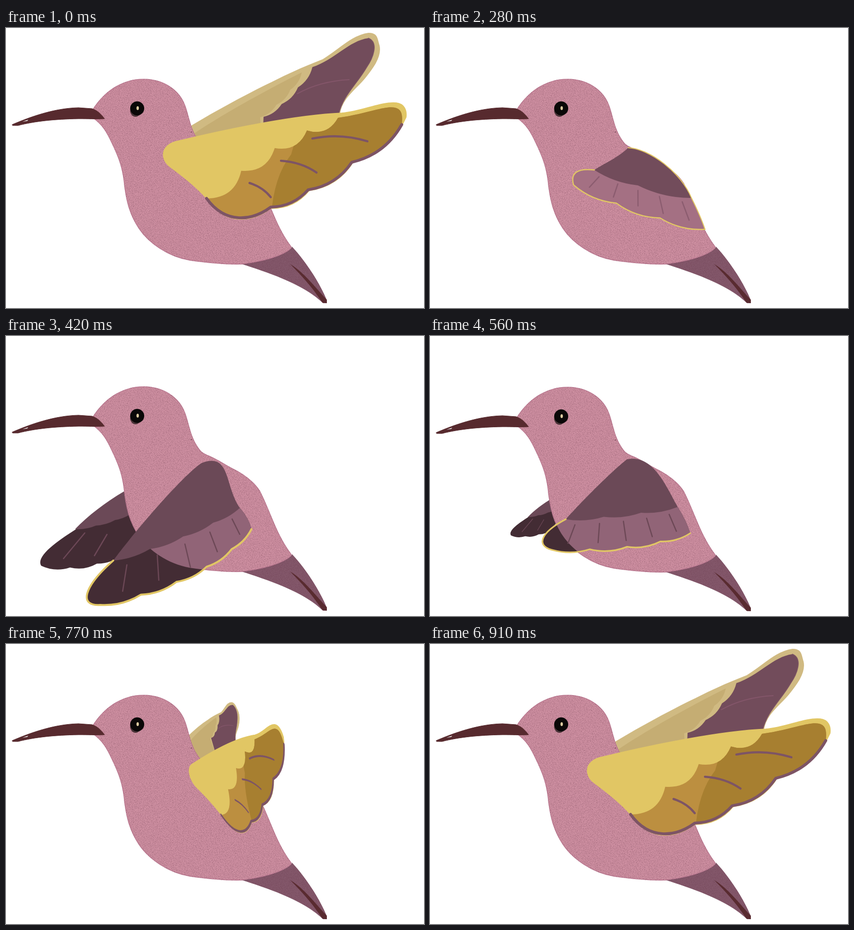
Write an HTML page that moves like this. It is 865 by 580 pixels and loops after 0.98 s.

```html
<!DOCTYPE html>
<html lang="en">
<head>
<meta charset="utf-8">
<title>Hummingbird</title>
<style>
html, body { margin: 0; width: 100%; height: 100%; overflow: hidden; background: #fff; }
svg { display: block; width: 865px; height: 580px; }
.pose { visibility: hidden; }
.pose.on { visibility: visible; }
</style>
</head>
<body>
<svg viewBox="0 0 865 580" xmlns="http://www.w3.org/2000/svg" stroke-linecap="round" stroke-linejoin="round">
  <defs>
    <filter id="grain" x="0" y="0" width="865" height="580" filterUnits="userSpaceOnUse" color-interpolation-filters="sRGB">
      <feTurbulence type="fractalNoise" baseFrequency=".7" numOctaves="2" seed="4"/>
      <feColorMatrix values="0 0 0 0 .38  0 0 0 0 .2  0 0 0 0 .27  1.2 0 0 0 -.54"/>
      <feComposite in2="SourceAlpha" operator="in" result="g"/>
      <feMerge><feMergeNode in="SourceGraphic"/><feMergeNode in="g"/></feMerge>
    </filter>
    <path id="torso" d="M181 167C205 131 240 106 285 106C325 106 358 128 370 160C378 180 380 206 395 229C402 240 406 244 416 248C435 255 450 266 465 274C490 286 512 302 525 322C546 362 560 415 590 453L589 457C575 470 540 482 488 489C450 490 415 486 380 481C335 473 295 445 275 415C255 385 248 355 244 315C240 285 232 265 220 240C210 218 200 200 181 187Z"/>
    <clipPath id="onBody"><use href="#torso" y="-1"/></clipPath>
    <g id="far"></g>
    <g id="near"></g>
  </defs>
  <g id="back"></g>
  <g id="bird">
    <g filter="url(#grain)">
      <path fill="#84586b" d="M592 453C622 485 650 530 664 564L664 570L656 570C620 535 560 512 488 489C540 482 575 470 589 457Z"/>
      <use href="#torso" fill="#cf90a2" stroke="#c27f97" stroke-width="1.5"/>
    </g>
    <path fill="#592b30" d="M588 489C613 503 638 535 664 563L664 570L655 569C632 535 612 513 588 489Z"/>
    <path fill="#572a2e" stroke="#572a2e" d="M13 200C50 184 100 166 150 165L178 167C190 171 198 180 204 188C185 189 170 188 150 188C100 189 60 193 25 202L14 202Z"/>
    <path fill="#fff" d="M34 194L46 190L44 192.500Z"/>
    <ellipse cx="268" cy="171" rx="11" ry="13" fill="#4b3439"/>
    <circle cx="271.500" cy="166.500" r="14.500" fill="#0a0808"/>
    <ellipse cx="272.500" cy="166" rx="2.500" ry="4" fill="#dccba0"/>
    <circle cx="383.500" cy="215.500" r="1" fill="#5a2c3c"/>
  </g>
  <g id="front"></g>
</svg>
<script>
const MAUVE = '#7d5465', PLUM = '#724c5b', DARK = '#432c34', GOLD = '#e1c664', TAN = '#d0ba82';
const $ = id => document.getElementById(id);
const lerp = (a, b, k) => a + (b - a) * k;
const between = (p, q, k) => p.map((v, i) => lerp(v, q[i], k));
const bend = (a, c, b, t) => between(between(a, c, t), between(c, b, t), t);

// Feathered edge: n lobes strung along the quadratic curve a-c-b.
function lobes(a, c, b, n, bulge) {
  let d = 'L' + a, p = a;
  for (let i = 1; i <= n; i++) {
    const q = bend(a, c, b, i / n);
    const x = (p[0] + q[0]) / 2 - 2 * bulge * (q[1] - p[1]);
    const y = (p[1] + q[1]) / 2 + 2 * bulge * (q[0] - p[0]);
    d += `Q${x} ${y} ${q}`;
    p = q;
  }
  return d;
}
const fill = (d, color, more = '') => `<path d="${d}" fill="${color}" ${more}/>`;
const line = (d, color, w) => `<path d="${d}" fill="none" stroke="${color}" stroke-width="${w}"/>`;
const repeat = (n, f) => Array.from({ length: n }, (_, i) => f(i)).join('');

function nearWing() {
  const rim = lobes([819, 200], [654, 333], [548, 371], 3, -.11) + 'C510 399 455 408 415 353';
  const ochre = 'M415 353' + lobes([415, 353], [561, 228], [687, 186], 4, .2) +
    'C745 178 785 160 805 165C820 168 821 182 819 200' + rim + 'Z';
  const outline = 'M415 353C390 325 360 303 340 288C318 272 318 240 360 233C460 209 600 180 695 176C740 172 775 152 808 155C824 157 830 170 828 185' +
    lobes([828, 185], [657, 338], [548, 374], 3, -.12) + 'C510 402 455 412 415 353Z';
  return `<clipPath id="inOchre"><path d="${ochre}"/></clipPath>` +
    fill(outline, GOLD, `stroke="${GOLD}" stroke-width="1.5"`) + fill(ochre, '#bc8f40') +
    fill('M608 200L900 100L900 400L548 400Q552 310 590 262Z', '#a77f30', 'clip-path="url(#inOchre)"') +
    line('M819 200' + rim, MAUVE, 6) +
    repeat(3, i => {
      const len = 114 * .68 ** i, turn = .05 + .27 * i;
      const x = 634 - 65 * i, y = 229 + 46 * i;
      const dx = len * Math.cos(turn), dy = len * Math.sin(turn);
      return line(`M${x} ${y}q${dx / 2 + dy * .2} ${dy / 2 - dx * .13} ${dx} ${dy}`, MAUVE, 4.5);
    });
}

function farWing() {
  const side = 'C772 30 760 62 746 82C725 118 697 140 688 180';
  return fill('M370 211C450 163 520 127 550 113C590 92 620 80 655 66C690 45 715 16 750 11C770 10 768 26 772 36C778 60 755 88 742 104C722 128 695 145 690 178L690 225L530 260L400 290Z',
      TAN, `stroke="${TAN}" stroke-width="2"`) +
    fill('M380 225C430 190 520 138 612 92' + lobes([612, 92], [580, 150], [526, 185], 3, -.1) + 'L530 260L400 290Z', '#c5ad73') +
    fill('M530 255' + lobes([533, 184], [592, 150], [634, 81], 3, .1) + 'C680 66 710 26 750 21' + side + 'L690 225Z', PLUM) +
    line('M750 21' + side, MAUVE, 1.5) + line('M603 136Q650 110 710 107', '#84566a', 2);
}

// Raised wing: k = 0 spread, k = 1 half closed.
function place(id, closed, k) {
  const m = [1, 0, 0, 1, 0, 0].map((v, i) => lerp(v, closed[i], k));
  return `<use href="#${id}" transform="matrix(${m})"/>`;
}
const raised = k => ({
  back: place('far', [.336, .094, .171, .543, 213.8, 44.5], k),
  front: place('near', [.43, -.0235, .286, .898, 165.7, 46.7], k)
});

// Lowered wing: shoulder, its two handles, heel, covert bend, covert tip, two handles,
// heel bend, trailing edge start, bend and end, two handles of the wing tip.
const keys = s => s.split(' ').map(p => p.split(',').map(Number));
const FOLDED = keys('410,248 455,250 520,300 541,352 420,329 340,294 365,278 390,268 560,390 569,417 428,387 297,325 290,300 305,290');
const SWEPT = keys('405,263 465,240 452,310 484,356 380,420 222,465 270,400 370,285 503,378 508,400 419,510 195,557 150,560 160,520');

function lowered(key, n, flap, down) {
  const [top, h1, h2, heel, mid, tip, k1, k2, turn, start, low, end, t1, t2] = key;
  const ridge = `M${top}C${h1} ${h2} ${heel}`;
  const trail = lobes(start, low, end, n, -.08) + `C${t1} ${t2} ${tip}`;
  const feathers = `M${heel}Q${turn} ${start}${trail}Z`;
  const coverts = ridge + lobes(heel, mid, tip, n - 1, -.06) + `C${k1} ${k2} ${top}Z`;
  const veins = repeat(5, i => {
    const t = .1 + .2 * i, a = bend(heel, mid, tip, t), b = bend(start, low, end, t);
    return line(`M${between(a, b, .2)}L${between(a, b, .8)}`, down ? '#6c4856' : '#8b5c6f', 2.5);
  });
  return (down ? fill(feathers, DARK) + fill(feathers, '#916477', 'clip-path="url(#onBody)"')
               : fill(feathers, '#a47083')) +
    veins + fill(coverts, down ? '#6b4957' : PLUM) +
    (down ? '' : line(ridge + `Q${turn} ${start}`, GOLD, 2)) +
    line(`M${start}${trail}`, GOLD, lerp(2.5, 4, flap));
}

// Foreshorten the points that lie below the line of the back.
function squash(key, k) {
  return key.map(([x, y]) => {
    const d = k * Math.max(0, (y - 248) * .783 - (x - 410) * .622);
    return [x + d * .622, y - d * .783];
  });
}

function sweptFar(k) {
  const feathers = 'M255 368L150 397C110 422 60 456 73 476' + lobes([73, 476], [165, 490], [240, 452], 3, .1) + 'L275 405Z';
  const coverts = 'M244 322C205 345 170 372 143 400' + lobes([143, 400], [210, 392], [262, 366], 3, .06) + 'Z';
  return `<g transform="translate(${262 * (1 - k)} ${350 * (1 - k)}) scale(${k})">` +
    fill(feathers, DARK) + fill(coverts, '#6b4957') +
    repeat(2, i => line(`M${163 + 46 * i} ${408 + 3 * i}l${18 * i - 44} ${53 - 9 * i}`, '#6d4857', 2.5)) + '</g>';
}

const swept = k => ({
  back: sweptFar(k),
  front: lowered(FOLDED.map((p, i) => between(p, SWEPT[i], k)), Math.round(lerp(3, 5, k)), k, true)
});
const folded = k => ({ back: '', front: lowered(squash(FOLDED, k), 3, 0, false) });

$('near').innerHTML = nearWing();
$('far').innerHTML = farWing();
const poses = [raised(0), raised(.5), raised(1), folded(.5), folded(0), swept(.5), swept(1)];
const last = poses.length - 1;
const sides = ['back', 'front'];
for (const s of sides)
  $(s).innerHTML = poses.map(p => `<g class="pose">${p[s]}</g>`).join('');

// The beat runs through the poses and back again.
let shown = -1;
function show(now) {
  const step = Math.floor(now % 980 / 70);
  const pose = Math.min(step, 2 * last + 1 - step);
  if (pose === shown) return;
  for (const s of sides)
    [...$(s).children].forEach((g, i) => g.classList.toggle('on', i === pose));
  $('bird').setAttribute('transform', `translate(0 ${pose === last ? -1 : 0})`);
  shown = pose;
}
function tick() {
  show(performance.now());
  requestAnimationFrame(tick);
}
show(0);
requestAnimationFrame(tick);
</script>
</body>
</html>
```
